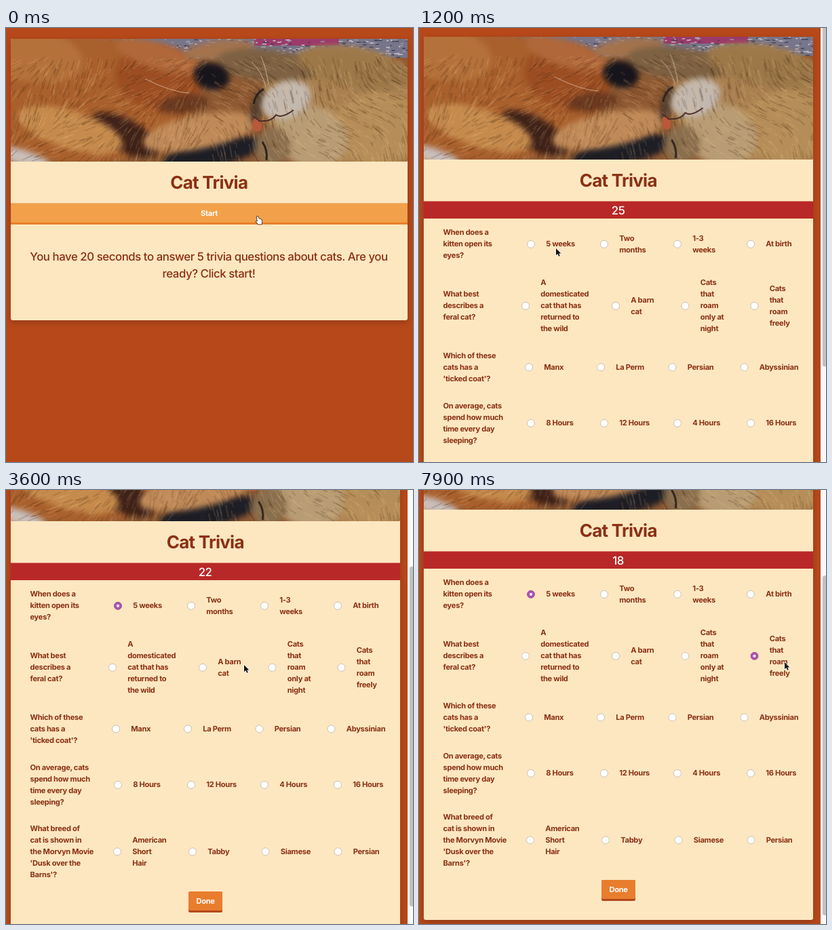
These frames come from a looping animation (600x640 px, 8000 ms). An HTML page with a canvas:

```html
<!DOCTYPE html>
<html lang="en">
<head>
<meta charset="utf-8">
<title>Cat Trivia</title>
<style>
html, body { margin: 0; width: 100%; height: 100%; overflow: hidden; background: #b7481a; }
canvas { display: block; width: 600px; height: 640px; }
</style>
</head>
<body>
<canvas id="stage" width="600" height="640"></canvas>
<script>
const ctx = document.getElementById('stage').getContext('2d');
const LOOP = 8000, QUIZ_AT = 300, FIRST_TICK = 1400;
const INK = '#8b3014', CREAM = '#fde7c1';
const SMALL = 11.15, MEDIUM = 16.85, LARGE = 26;

// Question, centre y, radio x positions, answers, chosen answer and click time
const rows = [
  { y: 321, q: 'When does a|kitten open its|eyes?', xs: [165, 273, 381, 489],
    a: ['5 weeks', 'Two|months', '1-3|weeks', 'At birth'], pick: 0, at: 2600 },
  { y: 412, q: 'What best|describes a|feral cat?', xs: [157, 290, 392.5, 494.5],
    a: ['A|domesticated|cat that has|returned to|the wild', 'A barn|cat',
        'Cats|that|roam|only at|night', 'Cats|that|roam|freely'], pick: 3, at: 6800 },
  { y: 502.5, q: "Which of these|cats has a|'ticked coat'?", xs: [162, 268, 373.5, 479.5],
    a: ['Manx', 'La Perm', 'Persian', 'Abyssinian'] },
  { y: 585, q: 'On average, cats|spend how much|time every day|sleeping?', xs: [165, 273, 381, 489],
    a: ['8 Hours', '12 Hours', '4 Hours', '16 Hours'] },
  { y: 683.5, q: "What breed of|cat is shown in|the Morvyn Movie|'Dusk over the|Barns'?", xs: [164, 275, 382.5, 489.5],
    a: ['American|Short|Hair', 'Tabby', 'Siamese', 'Persian'] }
];

// Keyframes: time, then values
const pointer = [
  [0, 368, 277], [200, 368, 277], [400, 356, 278], [1100, 202, 325], [1200, 202, 325],
  [1500, 205, 252], [2000, 205, 252], [2500, 164, 173], [2800, 164, 173], [3500, 351, 258],
  [3900, 351, 258], [4800, 320, 245], [5500, 320, 245], [6600, 493, 244], [7000, 493, 244], [7600, 539, 254]
];
const scrolling = [[1100, 0], [1200, 3], [1600, 148], [3500, 148], [3600, 151], [4100, 168]];

function track(keys, t) {
  const i = keys.findIndex(k => k[0] > t);
  if (i < 0) return keys[keys.length - 1].slice(1);
  if (i === 0) return keys[0].slice(1);
  const a = keys[i - 1], b = keys[i];
  const p = (t - a[0]) / (b[0] - a[0]), e = p * p * (3 - 2 * p);
  return a.slice(1).map((v, j) => v + (b[j + 1] - v) * e);
}

function text(str, x, y, size, weight, color, align = 'left') {
  ctx.font = `${weight} ${size}px Inter, sans-serif`;
  ctx.letterSpacing = `${-0.028 * size}px`;
  ctx.textRendering = 'geometricPrecision';
  ctx.textAlign = align;
  ctx.fillStyle = color;
  ctx.fillText(str, x, y);
}

function lines(str, x, midY) {
  const parts = str.split('|');
  parts.forEach((s, i) =>
    text(s, x, midY + 4 + (i - (parts.length - 1) / 2) * 17, SMALL, 700, INK));
}

function box(x, y, w, h, color, r = 0) {
  ctx.fillStyle = color;
  ctx.beginPath();
  ctx.roundRect(x, y, w, h, r);
  ctx.fill();
}

function makePhoto() {
  const c = document.createElement('canvas');
  c.width = 585;
  c.height = 181;
  const g = c.getContext('2d');
  let seed = 7;
  const rand = () => (seed = seed * 16807 % 2147483647) / 2147483647;
  g.translate(-7, -16);
  g.fillStyle = '#8f5a33';
  g.fillRect(7, 16, 585, 181);
  g.fillStyle = '#77758a';
  g.fillRect(7, 16, 585, 28);
  g.fillStyle = '#9c3a6c';
  g.fillRect(366, 16, 125, 10);
  for (let i = 0; i < 420; i++) {
    g.fillStyle = ['#c9c5cc', '#3c3f58', '#9b97a3'][i % 3];
    g.fillRect(70 + rand() * 522, 16 + rand() * 30, 2 + rand() * 5, 1.5);
  }
  const blobs = [
    [110, 105, 165, 95, 0, '#a9602d'], [40, 40, 75, 40, .2, '#b4713a'],
    [225, 75, 65, 48, .2, '#9c4e22'], [225, 42, 65, 20, .3, '#b0683a'],
    [315, 33, 52, 15, -.1, '#a4734d'], [175, 158, 55, 24, .5, '#3f2219'],
    [262, 112, 38, 14, -.1, '#6b3a20'], [95, 150, 80, 28, .3, '#c58a4c'],
    [500, 115, 125, 88, .1, '#a98050'], [385, 55, 75, 24, .1, '#7d6142'],
    [515, 60, 85, 28, .2, '#9c7849'], [550, 150, 70, 55, 0, '#b58d58'],
    [450, 160, 55, 45, .4, '#b89c74'], [303, 71, 27, 20, .2, '#17151c'],
    [305, 184, 75, 20, -.2, '#1d1e26'], [285, 153, 85, 25, -.2, '#c08a58'],
    [25, 191, 42, 11, .3, '#c9bfbd'], [393, 175, 26, 28, 0, '#8a6f4e'],
    [371, 116, 9, 28, .25, '#55402f'], [413, 106, 38, 27, -.4, '#c3b8ae']
  ];
  g.filter = 'blur(4px)';
  for (const [x, y, rx, ry, rot, color] of blobs) {
    g.fillStyle = color;
    g.beginPath();
    g.ellipse(x, y, rx, ry, rot, 0, 7);
    g.fill();
  }
  g.filter = 'none';
  // Fur: falls to the lower left on one cat, to the lower right on the other
  for (let i = 0; i < 1500; i++) {
    const x = 7 + rand() * 585, y = 42 + rand() * 150;
    const angle = (x < 300 ? 2.3 : .9) + Math.sin(x / 40 + y / 30) * .5, len = 6 + rand() * 14;
    g.strokeStyle = i % 2 ? 'rgba(245,200,145,.16)' : 'rgba(50,20,8,.18)';
    g.lineWidth = 1 + rand();
    g.beginPath();
    g.moveTo(x, y);
    g.lineTo(x + len * Math.cos(angle), y + len * Math.sin(angle));
    g.stroke();
  }
  // Nose, mouth, closed eye, whiskers
  g.fillStyle = '#b9583a';
  g.beginPath();
  g.ellipse(370, 143, 7, 10, -.2, 0, 7);
  g.fill();
  const curve = (d, color, w) => {
    g.strokeStyle = color;
    g.lineWidth = w;
    g.stroke(new Path2D(d));
  };
  curve('M372 137Q392 139 398 128Q406 134 424 121M364 130L374 137', '#4a2d28', 2);
  curve('M378 168Q386 180 384 195M365 112Q368 96 380 90', '#2f211d', 3);
  curve('M383 87Q378 65 362 50M387 84Q384 60 376 42M205 75Q245 95 270 96', 'rgba(255,245,230,.5)', 1);
  return c;
}
const photo = makePhoto();

function card(width, height) {
  ctx.save();
  ctx.shadowColor = 'rgba(0,0,0,.2)';
  ctx.shadowBlur = 9;
  ctx.shadowOffsetY = 3;
  box(7, 16, width, height, CREAM, 3);
  ctx.restore();
  ctx.save();
  ctx.beginPath();
  ctx.roundRect(7, 16, width, 181.5, 3);
  ctx.clip();
  ctx.drawImage(photo, 7 - (585 - width) / 2, 16);
  ctx.restore();
  text('Cat Trivia', 6.7 + width / 2, 237, LARGE, 700, INK, 'center');
}

function radio(x, y, on) {
  ctx.beginPath();
  ctx.arc(x, y, 5.5, 0, 7);
  ctx.fillStyle = on ? '#af52b4' : '#fff';
  ctx.fill();
  ctx.lineWidth = .8;
  ctx.strokeStyle = on ? '#8d3f92' : '#bdb4a6';
  ctx.stroke();
  if (!on) return;
  ctx.beginPath();
  ctx.arc(x, y, 2.1, 0, 7);
  ctx.fillStyle = '#fff';
  ctx.fill();
}

function intro() {
  card(585, 415);
  box(7, 258.5, 585, 31, '#f2a14a');
  box(7, 287, 585, 2.5, '#e9771f');
  ctx.setLineDash([1, 1]);
  ctx.lineWidth = 1;
  ctx.strokeStyle = '#d98a3c';
  ctx.strokeRect(7.5, 259, 584, 28);
  ctx.setLineDash([]);
  text('Start', 299.5, 277, SMALL, 700, '#fff', 'center');
  text('You have 20 seconds to answer 5 trivia questions about cats. Are you', 299, 343, MEDIUM, 450, INK, 'center');
  text('ready? Click start!', 299, 368, MEDIUM, 450, INK, 'center');
}

function quiz(t) {
  const [scroll] = track(scrolling, t);
  ctx.save();
  ctx.translate(0, -scroll);
  card(574, 786);
  box(7, 258.5, 574, 25.5, '#b92828');
  const left = t < FIRST_TICK ? 25 : 24 - Math.floor((t - FIRST_TICK) / 1000);
  text(left, 293.6, 277.7, MEDIUM, 450, '#fff', 'center');
  for (const row of rows) {
    lines(row.q, 35.5, row.y);
    row.xs.forEach((x, i) => {
      radio(x, row.y + .8, row.pick === i && t >= row.at);
      lines(row.a[i], x + 22.2, row.y);
    });
  }
  box(269, 743, 50, 31, '#b5481a', 2.5);
  box(269, 743, 50, 28, '#e97d2e', 2.5);
  text('Done', 294, 761.3, SMALL, 700, '#fff', 'center');
  ctx.restore();
  box(592, 0, 8, 640, '#fafafa');
  box(595, scroll * .775 - 4, 8, 501, '#c1c1c1', 3);
}

const arrow = new Path2D('M0 0V10.2L2.4 8L4.1 11.8L5.8 11L4.2 7.4H7.4Z');
const hand = new Path2D('M2 1Q3.2 .2 4 1.8L5 4.6Q8.8 4.6 9.2 7.2Q9.6 9.5 8.6 12.6H4L.8 9Q.2 7.6 2.8 8.2L1.6 2Z');

function cursor(x, y, shape, fill, edge) {
  ctx.save();
  ctx.translate(x, y);
  ctx.lineJoin = 'round';
  ctx.lineWidth = 1.4;
  ctx.strokeStyle = edge;
  ctx.stroke(shape);
  ctx.fillStyle = fill;
  ctx.fill(shape);
  ctx.restore();
}

function draw(now) {
  const t = Math.floor(now % LOOP / 100) * 100;
  box(0, 0, 600, 640, '#b7481a');
  const [x, y] = track(pointer, t);
  if (t < QUIZ_AT) {
    intro();
    cursor(x, y, hand, '#fff', '#111');
  } else {
    quiz(t);
    cursor(x, y, arrow, '#111', '#fff');
  }
  requestAnimationFrame(draw);
}
requestAnimationFrame(draw);
</script>
</body>
</html>
```
